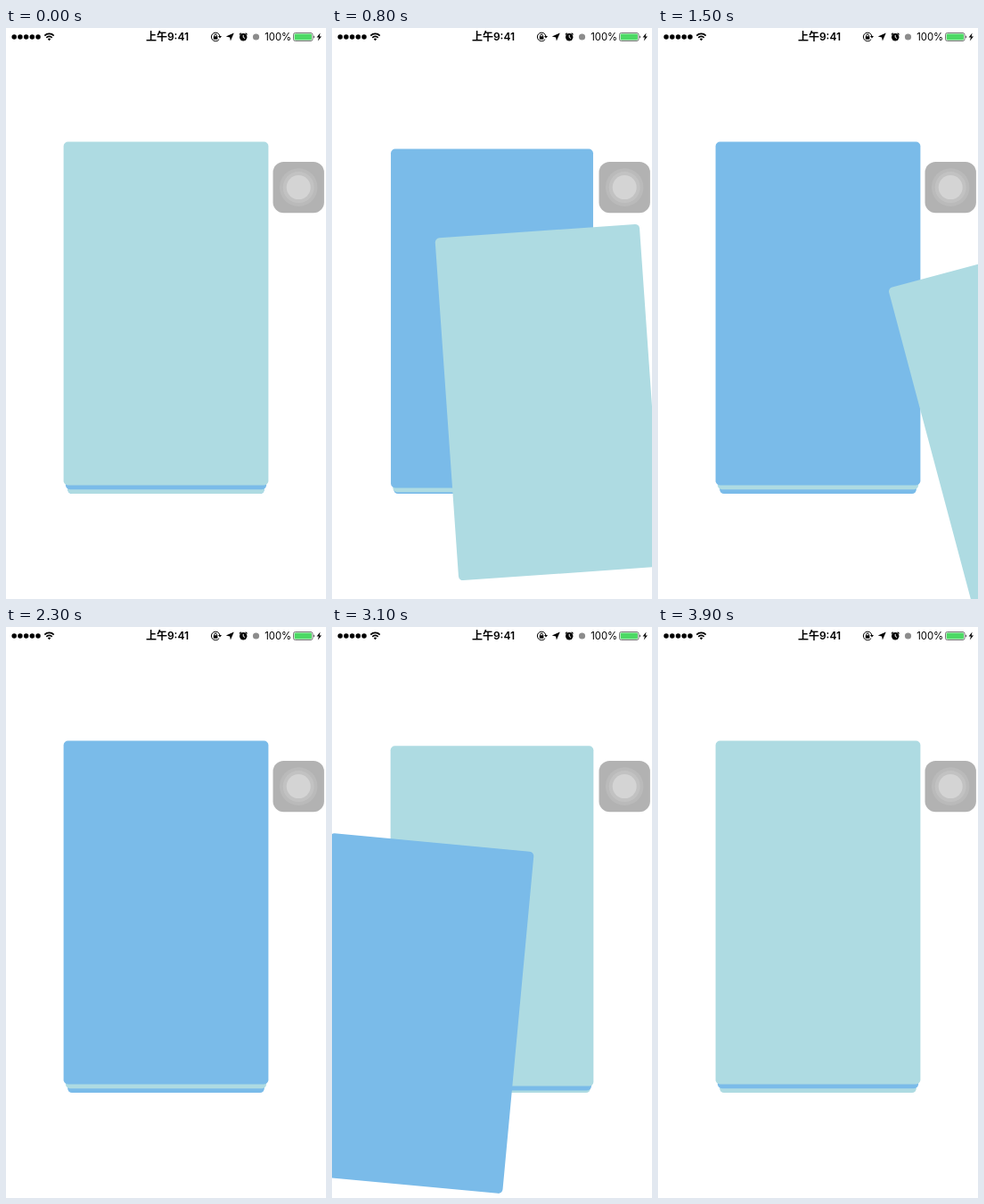
Recreate the animation shown at these times as an HTML page. Size 359 by 640 pixels, loop 4000 ms.

```html
<!DOCTYPE html>
<html lang="zh">
<head>
<meta charset="utf-8">
<title>Card stack</title>
<style>
  html, body { margin: 0; width: 100%; height: 100%; overflow: hidden; background: #fff; }
  svg { display: block; width: 359px; height: 640px; }
  text { font: 12px Inter, "Noto Sans CJK SC", "Noto Sans CJK", sans-serif; }
  .clock { font-weight: 600; }
  .charge { font-size: 11.3px; }
</style>
</head>
<body>
<svg viewBox="0 0 359 640">
  <g id="cards"></g>

  <g id="status">
    <g id="signal"></g>
    <path d="M43.3 8.6a7.2 7.2 0 0 1 10.4 0M45.3 10.8a4.5 4.5 0 0 1 6.4 0" fill="none" stroke="#000" stroke-width="1.7"/>
    <path d="M46.8 12.4a2.4 2.4 0 0 1 3.4 0l-1.7 1.8z"/>
    <text class="clock" x="181" y="14.3" text-anchor="middle">上午9:41</text>

    <g fill="none" stroke="#000">
      <path d="M239.2 12.6a4.8 4.8 0 1 1 .7-3.4"/>
      <path d="M233.7 9.5v-1a1.4 1.4 0 0 1 2.8 0v1"/>
    </g>
    <path d="M232.8 9.3h4.6v3.4h-4.6zM238 9h4l-2 2.6z"/>
    <path d="M255.8 5.6l-3.9 9-.8-4.2-4.3-.8z"/>
    <circle cx="266.2" cy="10.3" r="4.2"/>
    <path d="M261.8 7.4l2-1.7M270.6 7.4l-2-1.7" stroke="#000" stroke-width="1.2"/>
    <path d="M266.2 7.8v2.7l1.8 1" fill="none" stroke="#fff"/>
    <circle cx="280.5" cy="10" r="3.6" fill="#8c8c8c"/>
    <text class="charge" x="320.2" y="14.2" text-anchor="end">100%</text>
    <rect x="322.5" y="5.5" width="21.5" height="9" rx="2" fill="#fff" stroke="#555" stroke-width=".8"/>
    <rect x="323.6" y="6.6" width="19.3" height="6.8" rx="1" fill="#4cd964"/>
    <path d="M345 8.4a1.7 1.7 0 0 1 0 3.2z" fill="#555"/>
    <path d="M352.6 5.6l-4 5h2.4l-1.2 4 4.2-5.2h-2.4z"/>
  </g>

  <rect x="299.5" y="149.9" width="57.4" height="57.4" rx="12" fill-opacity=".3"/>
  <g fill="#fff">
    <circle cx="328.2" cy="178.6" r="21.3" opacity=".1"/>
    <circle cx="328.2" cy="178.6" r="17.5" opacity=".12"/>
    <circle cx="328.2" cy="178.6" r="13.5" opacity=".3"/>
  </g>
</svg>
<script>
const LOOP = 4000, STEP = 100;
const WIDTH = 229.8, HEIGHT = 384.8, DROP = 128, FLING = 14.5;
const COLORS = ['#aedbe2', '#7abbe9'];

// Times are in steps; speed and power shape the drag, reach and curve its downward bend
const SWIPES = [
  { start: 1, release: 13, side: 1, speed: 3.456, power: 1.5, reach: 46.8, curve: 1.3 },
  { start: 25, release: 33, side: -1, speed: 6.76, power: 1.413, reach: 42.1, curve: 1.09 }
];

function add(parent, tag, attrs) {
  const el = document.createElementNS('http://www.w3.org/2000/svg', tag);
  for (const key in attrs) el.setAttribute(key, attrs[key]);
  return document.getElementById(parent).appendChild(el);
}

for (let i = 0; i < 5; i++) add('signal', 'circle', { cx: 9.2 + i * 6.7, cy: 10, r: 2.75 });

const cards = [3, 2, 1, 0].map(() => add('cards', 'rect',
  { x: -WIDTH / 2, y: -HEIGHT / 2, width: WIDTH, height: HEIGHT, rx: 5 })).reverse();

// The finger drags the card, then it accelerates away on release
function offset(swipe, step) {
  const drag = swipe.speed * Math.max(0, step - swipe.start) ** swipe.power;
  const distance = drag + FLING * Math.max(0, step - swipe.release) ** 2;
  const dy = DROP * (1 - Math.exp(-((distance / swipe.reach) ** swipe.curve)));
  return { distance, dx: swipe.side * distance, dy };
}

function draw(step) {
  const turn = step < SWIPES[1].start ? 0 : 1;
  const { distance, dx, dy } = offset(SWIPES[turn], step);
  const progress = Math.min(1, Math.max(0, (distance - 17) / 125));
  cards.forEach((card, i) => {
    const depth = Math.min(2, i - progress);
    card.setAttribute('fill', COLORS[(i + turn) % 2]);
    card.setAttribute('transform', i
      ? `translate(179.5 ${320 + 8.7 * depth}) scale(${1 - 0.02 * depth})`
      : `translate(${179.5 + dx} ${320 + dy}) rotate(${-dx / 16})`);
  });
}

const start = performance.now();
function tick() {
  draw(Math.floor((performance.now() - start) % LOOP / STEP));
  requestAnimationFrame(tick);
}
tick();
</script>
</body>
</html>
```
